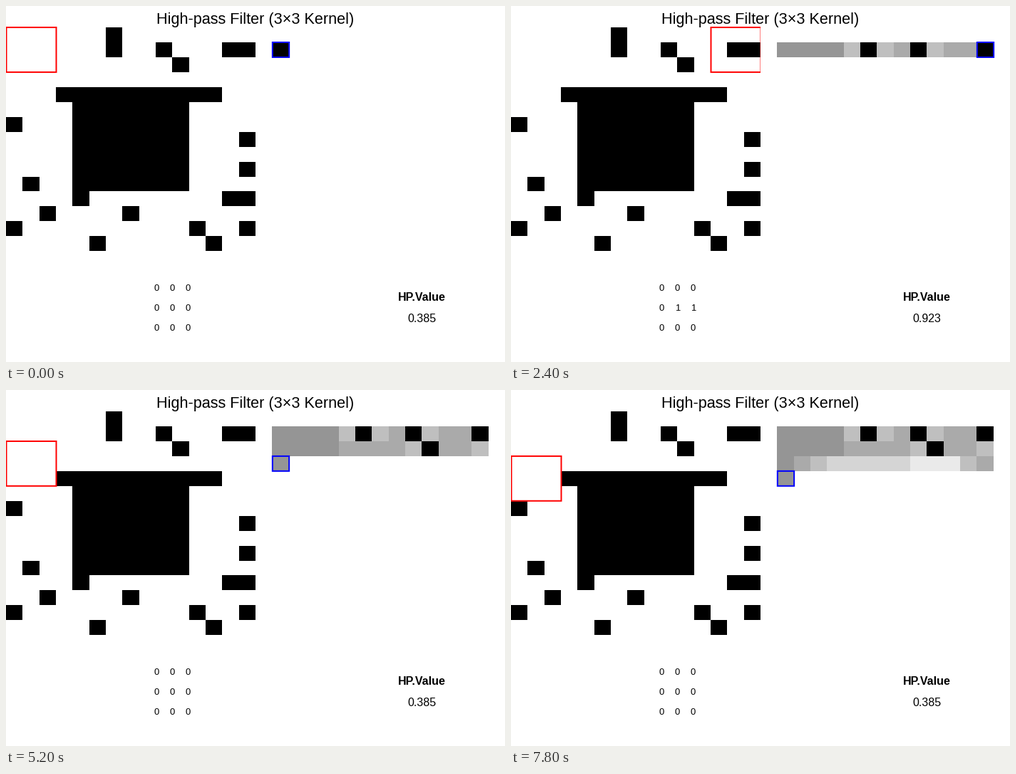
Animation of 700x500 px, one loop 8000 ms. Source, as a matplotlib script:

```python
import numpy as np
import matplotlib.pyplot as plt
from matplotlib.animation import FuncAnimation
from matplotlib.patches import Rectangle

W, H, DPI = 700, 500, 100
N = 15                        # input grid is N x N
STEPS = 40
TOP, CW, CH = 30.05, 350 / 15, 20.95
PX = 72 / DPI                 # points per pixel

plt.rcParams["font.family"] = "Liberation Sans"


def make_image():
    img = np.zeros((N, N), int)
    img[4, 3:13] = 1
    img[5:11, 4:11] = 1
    specks = {0: [6], 1: [6, 9, 13, 14], 2: [10], 6: [0], 7: [14], 9: [14],
              10: [1], 11: [4, 13, 14], 12: [2, 7], 13: [0, 11, 14],
              14: [5, 12]}
    for row, cols in specks.items():
        img[row, cols] = 1
    return img


def high_pass(win):
    """Laplacian response scaled to 0..1."""
    return (9 * win[1, 1] - win.sum() + 5) / 13


img = make_image()
cells = [divmod(i, N - 2) for i in range(STEPS)]
windows = [img[r:r + 3, c:c + 3] for r, c in cells]
values = [high_pass(w) for w in windows]

fig = plt.figure(figsize=(W / DPI, H / DPI), dpi=DPI, facecolor="white")
ax = fig.add_axes([0, 0, 1, 1])
ax.axis("off")


def mesh(x0, data):
    xs = np.round(x0 + CW * np.arange(N + 1))
    ys = np.round(TOP + CH * np.arange(N + 1))
    return ax.pcolormesh(xs, ys, data, cmap="gray_r", vmin=0, vmax=1,
                         antialiased=False, linewidth=0)


def frame_box(cols, rows, color):
    box = Rectangle((0, 0), cols * CW, rows * CH, fill=False, ec=color,
                    lw=2 * PX, snap=False, zorder=3)
    return ax.add_patch(box)


def label(x, y, text, size, **kw):
    return ax.text(x, y, text, fontsize=size * PX, ha="center",
                   va="baseline", color="black", **kw)


mesh(0, img)
result = mesh(350, np.zeros((N, N)))
ax.set_xlim(0, W)
ax.set_ylim(H, 0)

red = frame_box(3, 3, "red")
red.set_clip_path(Rectangle((0, 0), 350, H, transform=ax.transData))
blue = frame_box(1, 1, "blue")

label(350, 25, "High-pass Filter (3×3 Kernel)", 21.6)
label(583, 414, "HP.Value", 16, weight="bold")
value_text = label(583, 444, "", 16)
kernel_text = [label(233.5 + 22 * (j - 1), 400 + 28 * i, "", 13)
               for i in range(3) for j in range(3)]


def update(n):
    out = np.zeros((N, N))
    for (r, c), v in zip(cells[:n + 1], values):
        out[r + 1, c + 1] = v
    result.set_array(out)
    result.set_clim(0, out.max())

    r, c = cells[n]
    red.set_xy((c * CW + 0.5, TOP + r * CH))
    blue.set_xy((350 + (c + 1) * CW + 0.5, TOP + (r + 1) * CH))
    for t, k in zip(kernel_text, windows[n].flat):
        t.set_text(str(k))
    value_text.set_text(f"{values[n]:.3f}")
    return [result, red, blue, value_text, *kernel_text]


anim = FuncAnimation(fig, update, frames=STEPS, interval=200,
                     init_func=lambda: update(0), repeat=True,
                     repeat_delay=0, blit=False)
plt.show()
```
